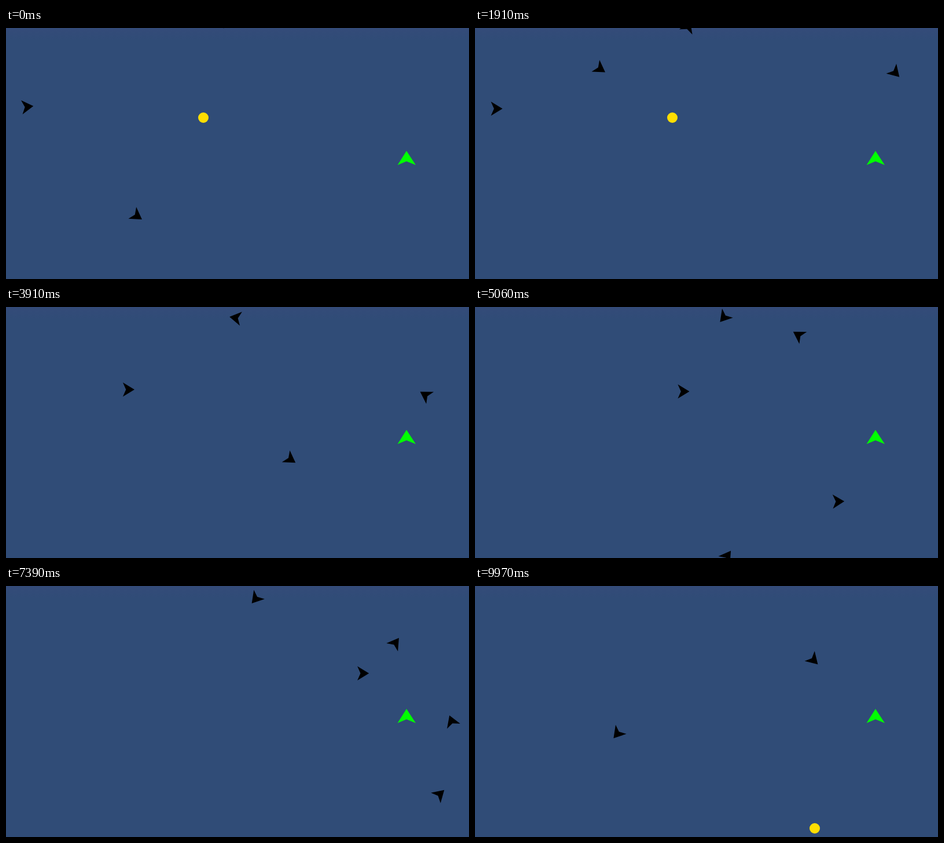
These frames come from a looping animation (800 by 434 pixels, 10000 ms). An HTML page:

```html
<!DOCTYPE html>
<html lang="en">
<head>
<meta charset="utf-8">
<title>Drifting ships</title>
<style>
  html, body { margin: 0; width: 100%; height: 100%; overflow: hidden; background: #304c77; }
  svg { display: block; width: 100%; height: 100%; }
</style>
</head>
<body>
<svg viewBox="0 0 800 434">
  <defs>
    <linearGradient id="sky" x1="0" y1="0" x2="0" y2="1">
      <stop offset="0" stop-color="#344b79"/>
      <stop offset=".05" stop-color="#304c77"/>
    </linearGradient>
  </defs>
  <rect width="800" height="434" fill="url(#sky)"/>
  <circle id="coin" r="9" fill="#ffde00"/>
  <path d="M692 212.5L708 237L692 230.5L676.5 237Z" fill="#00ff00"/>
  <g id="ships"></g>
</svg>
<script>
// Times in seconds, angles in degrees, speeds in pixels per second
const LOOP = 10;
const CRUISE = 170;

const clamp01 = u => Math.min(1, Math.max(0, u));
const mix = (a, b, u) => a + (b - a) * u;

// Flies straight along its heading and passes (x, y) at the given time
function cruiser(time, x, y, heading, speed = CRUISE) {
  const angle = heading * Math.PI / 180;
  return t => {
    const way = speed * (t - time);
    return [x + way * Math.cos(angle), y + way * Math.sin(angle), heading];
  };
}

// Drifts smoothly through waypoints [time, x, y] while its nose turns at a steady rate
function drifter(turn, points) {
  const last = points.length - 1;
  const rate = (i, axis) =>
    (points[i + 1][axis] - points[i][axis]) / (points[i + 1][0] - points[i][0]);
  const slope = (i, axis) => {
    if (i === 0) return rate(0, axis);
    if (i === last) return rate(last - 1, axis);
    const [before, now, after] = [points[i - 1][0], points[i][0], points[i + 1][0]];
    return mix(rate(i - 1, axis), rate(i, axis), (now - before) / (after - before));
  };
  return t => {
    const next = points.findIndex(p => p[0] > t);
    const i = next < 0 ? last - 1 : Math.max(0, next - 1);
    const a = points[i], b = points[i + 1];
    const span = b[0] - a[0];
    const u = clamp01((t - a[0]) / span), v = 1 - u;
    const place = axis => mix(a[axis], b[axis], u * u * (3 - 2 * u))
      + span * u * v * (slope(i, axis) * v - slope(i + 1, axis) * u);
    const turned = clamp01((t - turn.start) / (turn.end - turn.start));
    return [place(1), place(2), mix(turn.from, turn.to, turned)];
  };
}

const flights = [
  cruiser(0, 223.7, 323.3, 34),
  cruiser(2.73, 783.7, 137, 46, 105),
  cruiser(5.06, 561.3, 50, -148),
  cruiser(7.39, 671, 100.7, -54.5, 175),
  cruiser(7.39, 747.3, 362, -43),
  cruiser(8.94, 474.3, 17.3, 45, 149),
  drifter({ start: 0, end: 0.97, from: -6, to: 0 }, [
    [0, 34, 136.5], [0.97, 14.7, 138.8], [2.73, 80.5, 140],
    [5.06, 357, 146], [7.39, 613.7, 151], [10, 855, 155],
  ]),
  drifter({ start: 1.76, end: 5.06, from: -60, to: -230 }, [
    [0.97, 369, -11], [2.73, 369.8, 9], [5.06, 432, 15.7], [6.2, 449, -12],
    [7.39, 433.3, 19.7], [8.94, 333.7, 145.7], [9.97, 248, 253],
  ]),
  drifter({ start: 4.3, end: 7.39, from: 34, to: -111 }, [
    [0, -59, -116], [2.73, 326.7, 144.3], [5.06, 624.7, 336.3],
    [7.39, 771, 236.3], [8.94, 721.3, 100.3], [9.97, 670, -15],
  ]),
];

const coins = [
  { from: 0, to: 2.8, x: 341, y: 155 },
  { from: 7.75, to: LOOP, x: 587, y: 419 },
];

function makeShip(locate) {
  const el = document.createElementNS("http://www.w3.org/2000/svg", "path");
  el.setAttribute("d", "M13.4 0L-6.7 12.2L-1.3 0L-6.7 -12.2Z");
  document.getElementById("ships").append(el);
  return { el, locate };
}

const ships = flights.map(makeShip);
const coinEl = document.getElementById("coin");

function draw(t) {
  for (const { el, locate } of ships) {
    const [x, y, heading] = locate(t);
    el.setAttribute("transform", `translate(${x} ${y}) rotate(${heading})`);
  }
  const coin = coins.find(c => t >= c.from && t < c.to);
  coinEl.style.display = coin ? "" : "none";
  if (coin) coinEl.setAttribute("transform", `translate(${coin.x} ${coin.y})`);
}

const start = performance.now();
function tick() {
  draw((performance.now() - start) / 1000 % LOOP);
  requestAnimationFrame(tick);
}
draw(0);
requestAnimationFrame(tick);
</script>
</body>
</html>
```
